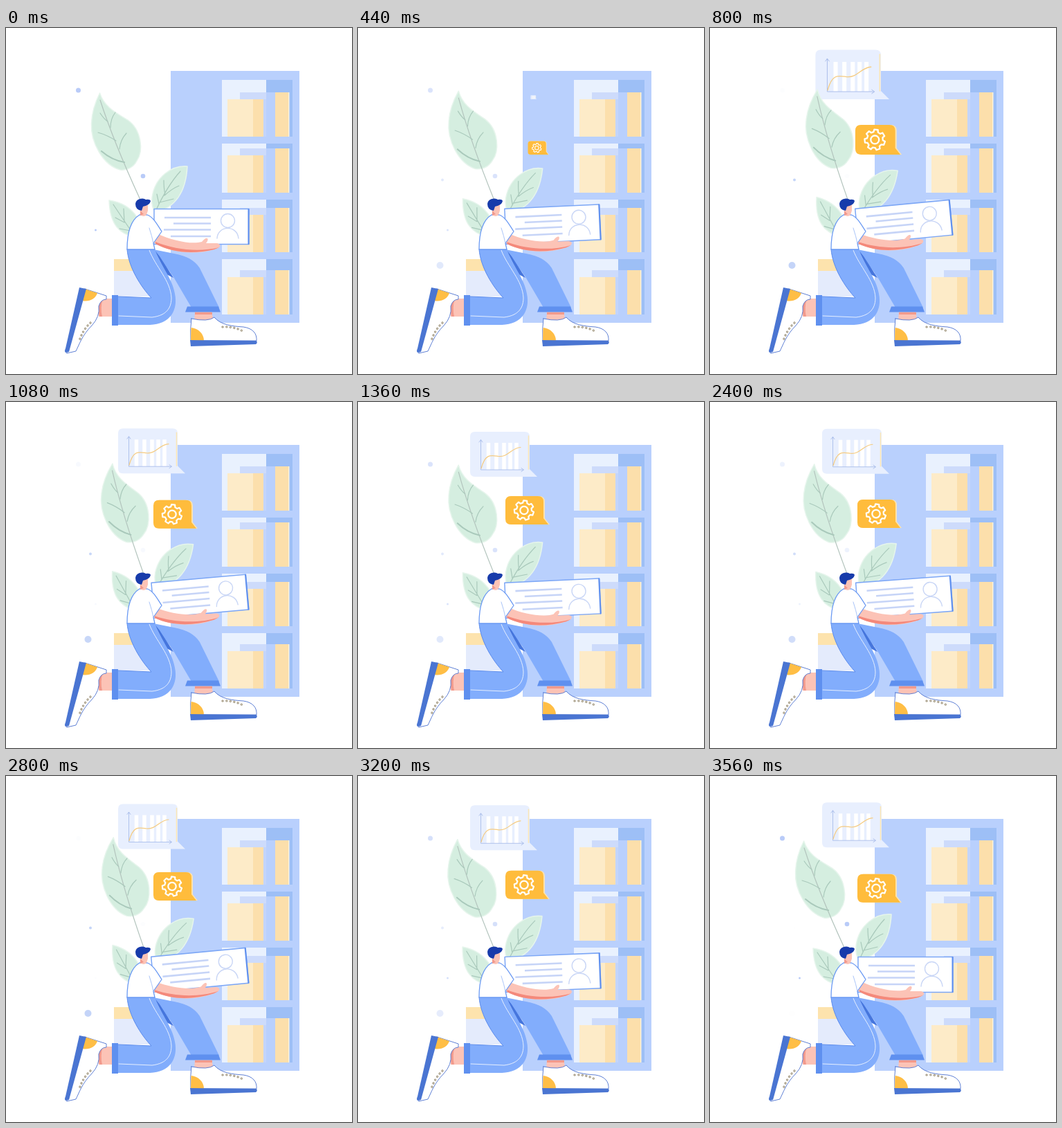
Write an HTML page that moves like this. It is 500 px wide and 500 px high and loops after 3600 ms.

```html
<!DOCTYPE html>
<html>
<head>
<meta charset="utf-8">
<style>
  html, body { margin: 0; width: 100%; height: 100%; overflow: hidden; background: #fff; }
  svg { display: block; width: 100vw; height: 100vh; }
</style>
</head>
<body>
<svg viewBox="0 0 500 500" fill="none" stroke-linecap="round" stroke-linejoin="round">
  <rect x="238" y="62" width="186" height="364" fill="#b9d0fd"/>
  <g id="shelf"></g>

  <g id="dotsA" fill="#b9cbf8">
    <circle cx="104.500" cy="90" r="3.500"/><circle cx="198" cy="214" r="3.300"/><circle cx="129.500" cy="292" r="1.500"/>
  </g>
  <g id="dotsB" fill="#c3d3f8">
    <circle cx="118.500" cy="343" r="5"/><circle cx="122" cy="219.500" r="2"/>
  </g>

  <g id="chart">
    <path d="M169 38H241Q248 38 248 45V92L259 103H169Q162 103 162 96V45Q162 38 169 38Z" fill="#e8effe"/>
    <path d="M246.500 44V92" stroke="#fbe6b5" stroke-width="1.500"/>
    <path d="M188.500 54V93M200 54V93M211 54V93M220 54V93M229 54V93" stroke="#fff" stroke-width="5.500" stroke-linecap="butt"/>
    <path d="M177.500 50V93H239M175 53L177.500 49.500L180 53M236 90.500L239.500 93L236 95.500" stroke="#a9bdea" stroke-width=".9"/>
    <path d="M178 91C184 69 192 72 203 73.500C217 75 222 61 235 60.500" stroke="#f5cb80" stroke-width="1.200"/>
  </g>
  <g id="gear">
    <path d="M222 142H262Q270 142 270 150V174L277 183H222Q214 183 214 174V150Q214 142 222 142Z" fill="#fde3ae"/>
    <path d="M221 142H260Q268 142 268 150V174L275 183H221Q213 183 213 175V150Q213 142 221 142Z" fill="#ffbc3c"/>
    <path id="cog" stroke="#fff" stroke-width="2.200"/>
    <circle cx="240" cy="162.500" r="5.700" stroke="#fff" stroke-width="2.200"/>
  </g>

  <g id="leaves">
    <g fill="#d5eee0" stroke="#e6f5ec" stroke-width="1.500">
      <path d="M135.500 94C142 114 158 122 176 133C196 147 199 178 189 192C184 202 174 206 165 205C140 198 122 165 123.500 138C124 120 130 105 135.500 94Z"/>
      <path d="M262 200C240 198 215 215 211 245C210 255 212 262 216 267C242 260 260 240 262 200Z"/>
      <path d="M149 249C170 252 182 262 190 274L186 302C165 298 150 285 149 249Z"/>
    </g>
    <g stroke="#a9c9bb" stroke-width="1.200">
      <path d="M136 104C145 132 158 170 194 248" stroke="#b3c4bd"/>
      <path d="M136 123Q142 132 147 135M133 151Q147 155 159 163M158 122Q151 131 151 144M174 152Q165 162 164 175"/>
      <path d="M138 178Q153 191 171 194" stroke-width="2"/>
      <path d="M252 207Q233 228 216 265M228 220Q228 232 230 241M250 228Q240 232 229 242M218 240L221 254M242 247L222 252"/>
      <path d="M155 255Q167 273 184 298M158 274L171 281M170 261L171 280M164 290L180 293"/>
    </g>
  </g>

  <path d="M156 334H215V388H156Z" fill="#e4ebfc"/>
  <path d="M156 334H183V351H156Z" fill="#fde3ad"/>

  <g id="card">
    <rect x="214" y="261.500" width="137" height="51" fill="#fff" stroke="#7ba6f6" stroke-width="1.500"/>
    <path d="M350.500 262V312" stroke="#6090ee" stroke-width="2"/>
    <path d="M229 274H296M242 282.500H296M228 291.500H296M238 301H296" stroke="#c6d4f7" stroke-width="2.600" stroke-linecap="butt"/>
    <g stroke="#c9d6f6" stroke-width="1.400"><circle cx="320.500" cy="278.500" r="10"/><path d="M305 304C306 285 334 284 336 304"/></g>
  </g>

  <!-- far leg -->
  <path d="M213 320L243 326C262 330 272 335 280 347L308 404H268L241 358L220 330Z" fill="#82adfc"/>
  <path d="M214 320L222 330L242 361L232 356Z" fill="#4676dd"/>
  <path d="M273 410H297L300 424H272Z" fill="#fcc3b6"/>
  <path d="M273 411H298L298 414H273Z" fill="#f29a8c"/>
  <path d="M262 402.500H307L310 410.500H259Z" fill="#5f90ef"/>
  <path d="M268 420Q266 434 267 452H362C363 442 357 434 343 432C327 431 310 429 301 418Q292 425 268 420Z" fill="#fff" stroke="#4d72d0" stroke-width=".9"/>
  <path d="M267.500 433C278 434 286 442 286 452H267Z" fill="#ffbe45"/>
  <path d="M266 451L362 452Q364 455 361 457L267 460Z" fill="#4a75d2"/>
  <path d="M313 432Q329 431 342 438" stroke="#978b70" stroke-width="3.200" stroke-dasharray="0.100 5.500"/>
  <path d="M313 432Q329 431 342 438" stroke="#fff" stroke-width="1.200" stroke-dasharray="0.100 5.500"/>

  <!-- near leg -->
  <path d="M155 391H135Q131 404 134 417H155Z" fill="#fcc3b6"/>
  <path d="M140 391H136Q132 404 135 417H139Q136 404 140 391Z" fill="#f29a8c"/>
  <path d="M114 377L145 387V392Q137 392 134 402Q136 417 124 430C110 444 106 457 101 467L88 470Z" fill="#fff" stroke="#4d72d0" stroke-width=".9"/>
  <path d="M114 377L132 383C129 392 120 396 110 394Z" fill="#ffbe45"/>
  <path d="M106 375L116 377L91 468L86 469Q84 467 86 463Z" fill="#4a75d2"/>
  <path d="M122 426Q111 436 106 452" stroke="#978b70" stroke-width="3.200" stroke-dasharray="0.100 5.500"/>
  <path d="M122 426Q111 436 106 452" stroke="#fff" stroke-width="1.200" stroke-dasharray="0.100 5.500"/>
  <path d="M175 319C176 345 195 374 210 390L161 388V429L208 429C237 428 249 408 244 384C240 360 222 342 215 319Z" fill="#82adfc"/>
  <path d="M175 320C177 346 195 374 210 390L161 388" stroke="#5c8cec"/>
  <path d="M207 321C216 345 238 365 239 390C239 408 228 416 211 418L163 416" stroke="#e6effe"/>
  <path d="M153 386H162V430H153Z" fill="#5f90ef"/>

  <g id="arm">
    <path d="M218 297C242 308 268 313 283 309Q288 303 291 304Q293 306 289 311L305 311C313 313 309 318 301 320C275 328 240 326 213 310Z" fill="#fcc3b6"/>
    <path d="M216 312C240 325 270 327 301 320L308 317C280 324 245 321 216 309Z" fill="#f4897b"/>
  </g>
  <path d="M193 270C183 276 175 291 175 320H215L213 311L225 294C219 285 213 273 204 270Z" fill="#fff" stroke="#6a99f3" stroke-width="1.300"/>
  <path d="M207 289Q211 301 213 311" stroke="#a9c4f8"/>
  <path d="M194 258V270Q199 274 203 270L205 264V255H195Z" fill="#fcc3b6"/>
  <path d="M194 264L199 269L194 271Z" fill="#f29a8c"/>
  <path d="M187 254Q188 247 196 246.500Q200 246 202 248Q208 247 209 250Q208 256 198 258L196 264Q187 263 187 254Z" fill="#173bab"/>
</svg>
<script>
  const $ = id => document.getElementById(id);
  const rect = (x, y, w, h, fill) => `<rect x="${x}" y="${y}" width="${w}" height="${h}" fill="${fill}"/>`;

  // Shelf compartments: equal contents standing on each floor
  $('shelf').innerHTML = [[75, 157], [167, 238], [248, 324], [334, 414]].map(([top, floor]) =>
    rect(312, top, 64, floor - top, '#e9f1fe') +
    rect(376, top, 38, floor - top, '#9dbff6') +
    rect(338, floor - 64, 38, 64, '#cddbfb') +
    rect(372, floor - 54, 4, 54, '#c3d5fc') +
    rect(376, floor - 64, 13, 64, '#b9d0fd') +
    rect(320, floor - 54, 37, 54, '#fdebc8') +
    rect(357, floor - 54, 15, 54, '#fcdfac') +
    rect(389, floor - 64, 20, 64, '#fcdfab') +
    rect(408, floor - 64, 1.5, 64, '#fff3da')).join('');

  const TEETH = 7;
  const cogPoints = [];
  for (let i = 0; i < TEETH; i++) {
    for (const [shift, r] of [[-.32, 11], [-.2, 14.2], [.2, 14.2], [.32, 11]]) {
      const a = (i + shift) / TEETH * 2 * Math.PI - 1.45;
      cogPoints.push((240 + r * Math.cos(a)).toFixed(2) + ' ' + (162.5 + r * Math.sin(a)).toFixed(2));
    }
  }
  $('cog').setAttribute('d', 'M' + cogPoints.join('L') + 'Z');

  const LOOP = 3600, SWAY = 1800, FLOAT = 640, FLOAT_START = 1040;
  const wave = (t, period) => (1 - Math.cos(2 * Math.PI * t / period)) / 2;
  const ease = x => wave(Math.min(1, Math.max(0, x)), 2);
  const pop = (t, start, peak) => peak * ease((t - start) / 440) - (peak - 1) * ease((t - start - 440) / 240);
  const move = (id, transform) => $(id).setAttribute('transform', transform);
  const bubble = (id, x, y, dy, scale) =>
    move(id, `translate(${x} ${y + dy}) scale(${scale}) translate(${-x} ${-y})`);

  function draw(now) {
    const t = now % LOOP;
    const sway = wave(t, SWAY);
    const lift = t < FLOAT_START ? 0 : wave(t - FLOAT_START, FLOAT);
    move('leaves', `rotate(${5.6 * sway} 200 300)`);
    move('card', `rotate(${-5.6 * sway} 210 307)`);
    move('arm', `rotate(${-4.2 * sway} 220 325)`);
    bubble('chart', 258, 103, 5 * lift, pop(t, 360, 1.1));
    bubble('gear', 275, 183, -6 * lift, pop(t, 240, 1.1));
    $('dotsA').setAttribute('opacity', 1 - sway);
    $('dotsB').setAttribute('opacity', sway);
  }

  const start = performance.now();
  function tick() {
    draw(performance.now() - start);
    requestAnimationFrame(tick);
  }
  tick();
</script>
</body>
</html>
```
